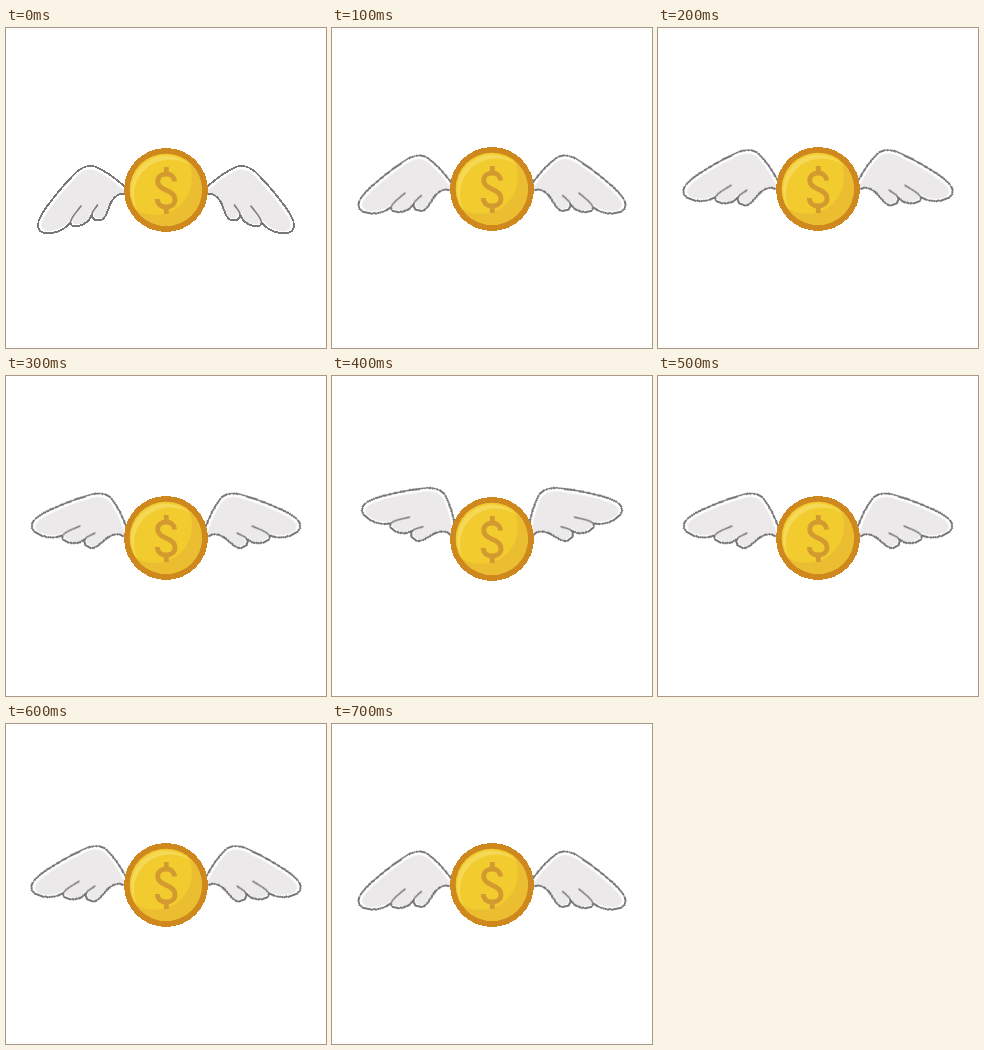
An HTML page for the animation above (800 ms loop, 320 px wide and 320 px high).

```html
<!DOCTYPE html>
<html lang="en">
<head>
<meta charset="utf-8">
<title>Flying coin</title>
<style>
html, body { margin: 0; width: 100%; height: 100%; overflow: hidden; background: #fff; }
svg { display: block; width: 100%; height: 100%; }
.wing { transform-origin: 128px 160px; }
</style>
</head>
<body>
<svg viewBox="0 0 320 320">
  <defs>
    <path id="shape" d="M124 162 L117.5 157.5 C110 151 98 142 89 138.6 C82 136.6 74 140 68 146.5 C57 158 42 176 35 187.5 C31 195 31 201.5 36 204.3 C44 207 57 204 64.5 194.5 C64.5 198 68 199 73 198 C80 196 84.5 191 85.8 186.5 C85.500 191 90 193.500 95.500 192 C102 188.500 102 179 105.500 173.500 C109 168 113 165.500 118 165.500 L124 166 Z"/>
    <clipPath id="inside"><use href="#shape"/></clipPath>
    <clipPath id="face"><circle cx="160" cy="162" r="36.3"/></clipPath>
    <g id="feathers" fill="none" stroke-linecap="round" stroke-linejoin="round">
      <use href="#shape" fill="#ebe9ea"/>
      <g clip-path="url(#inside)" stroke="#fff">
        <path stroke-width="7" d="M117.5 157.5 C110 151 98 142 89 138.6 C82 136.6 74 140 68 146.5 C57 158 42 176 35 187.5 C31 195 31 201.5 36 204.3"/>
        <path stroke-width="4.5" d="M36 204.3 C44 207 57 204 64.5 194.5 C64.5 198 68 199 73 198 M85.8 186.5 C85.5 191 90 193.5 95.5 192"/>
      </g>
      <g stroke="#787778" stroke-width="1.9">
        <use href="#shape" shape-rendering="crispEdges"/>
        <path stroke-width="1.5" d="M64.5 194.500 C65 189 70 185 75 178 M85.800 186.500 C86 183.500 89 181 91.500 177"/>
      </g>
    </g>
  </defs>

  <g class="wing"><use href="#feathers"/></g>
  <g transform="matrix(-1 0 0 1 320 0)"><g class="wing"><use href="#feathers"/></g></g>

  <g id="coin">
    <circle cx="160" cy="162" r="42" fill="#cf881d" shape-rendering="crispEdges"/>
    <g clip-path="url(#face)">
      <circle cx="160" cy="162" r="36.3" fill="#ebbe31"/>
      <circle cx="149" cy="150" r="37" fill="#f2cb2e"/>
      <path d="M131 182 A35 35 0 0 1 186 139 A36 36 0 0 0 131 182 Z" fill="#f5d855"/>
    </g>
    <g fill="none" stroke="#d39a30" stroke-width="4.8">
      <path d="M168.7 153.5 C168 148.5 164.5 146 160.3 146 C155 146 151.7 149 151.7 153.5 C151.7 158 155.500 160.300 160.300 162.200 C165.800 164.300 169 167 169 171.500 C169 176 165.500 179 160.300 179 C154.800 179 151.300 176 151.300 171"/>
      <path d="M160.300 139 V147 M160.300 178 V186"/>
    </g>
  </g>
</svg>
<script>
// One row per step of the upstroke: wing angle, wing dx, wing dy, coin dy
const up = [
  [0, 0, 0, 0],
  [12, 0.5, -1.5, -1],
  [20.5, 1, -1, -1],
  [29, 1, 0, 0],
  [39, 2, 0.5, 1]
];
const beat = [...up, up[3], up[2], up[1], up[0]];
const timing = { duration: 800, iterations: Infinity };

const frames = toTransform => beat.map((row, i) => ({
  offset: i / 8,
  easing: "steps(1, end)",
  transform: toTransform(row)
}));

const flap = frames(([angle, dx, dy]) => `translate(${dx}px, ${dy}px) rotate(${angle}deg)`);
const bob = frames(row => `translate(0px, ${row[3]}px)`);

const moves = [...document.querySelectorAll(".wing")].map(w => w.animate(flap, timing));
moves.push(document.getElementById("coin").animate(bob, timing));
moves.forEach(m => { m.startTime = 0; });
</script>
</body>
</html>
```
